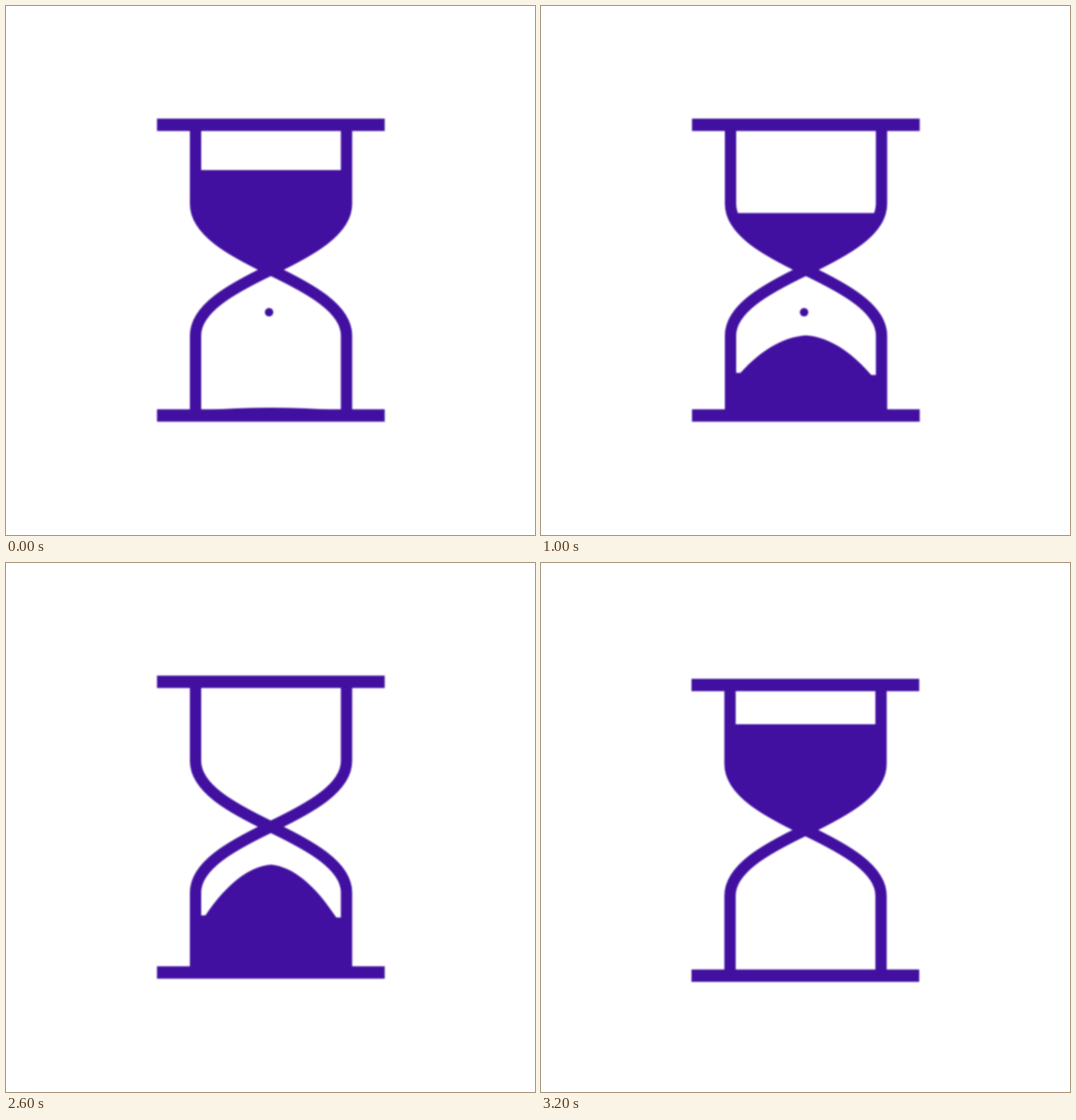
Write an HTML page that moves like this. It is 748 px wide and 748 px high and loops after 3.8 s.

```html
<!DOCTYPE html>
<html lang="en">
<head>
<meta charset="utf-8">
<title>Hourglass</title>
<style>
  html, body { margin: 0; width: 100%; height: 100%; overflow: hidden; background: #fff; }
  svg { display: block; width: 100%; height: 100%; filter: blur(.8px); }
  path, rect, circle { fill: #4210a0; }
  .line { fill: none; stroke: #4210a0; stroke-width: 16; }
  .bar { stroke-width: 17.5; }
  .turning .line { stroke-width: 14.5; }
  .turning .bar { stroke-width: 15.5; }
</style>
</head>
<body>
<svg viewBox="0 0 748 748">
  <defs>
    <clipPath id="inside">
      <path d="M268 168V280C268 318 318 346 374.5 373C431 346 481.5 318 481.5 280V168Z
               M268 579V466C268 428 318 400 374.5 373C431 400 481.5 428 481.5 466V579Z"/>
    </clipPath>
  </defs>
  <g id="glass">
    <g clip-path="url(#inside)">
      <rect id="upper" x="260" width="230"/>
      <path id="mound"/>
    </g>
    <circle id="grain" cx="372" cy="433" r="6"/>
    <path class="line" d="M268 168V280C268 318 318 346 374.5 373C431 400 481.5 428 481.5 466V579
                          M481.5 168V280C481.5 318 431 346 374.5 373C318 400 268 428 268 466V579"/>
    <path class="line bar" d="M213.5 168H535.5M213.5 579H535.5"/>
  </g>
</svg>
<script>
const STEP = 200, LOOP = 3800;
const TURN = 14, REFILL = 16;   // steps where the flip starts and ends
const NECK = 373, MID = 374.5, FLOOR = 579;
const $ = id => document.getElementById(id);

function moundPath(peak, edge) {
  const inset = edge < 530 ? 6 : 0;
  const left = 276 + inset, right = 473 - inset;
  const end = edge + inset / 2;
  const lw = (MID - left) / 3, rw = (right - MID) / 3;
  const low = y => y - 0.63 * (y - peak);
  const high = peak + 0.04 * (edge - peak);
  return `M260 ${FLOOR}V${edge}H${left}` +
    `C${left + lw} ${low(edge)} ${MID - lw} ${high} ${MID} ${peak}` +
    `C${MID + rw} ${high} ${right - rw} ${low(end)} ${right} ${end}H490V${FLOOR}Z`;
}

function pose(i) {
  if (i < TURN) return "";
  if (i < REFILL) return `rotate(${60 * (i - TURN + 1)} 374.5 373.7)`;
  return "translate(-.7 4.5)";
}

function draw(i) {
  const full = i === REFILL;
  const level = full ? 223.5 : Math.min(NECK, 232 + 12 * i + 0.006 * i ** 3);
  const left = Math.exp(-0.105 * i ** 1.55);   // share of the mound still to rise
  $("upper").setAttribute("y", level);
  $("upper").setAttribute("height", NECK - level);
  $("mound").setAttribute("d", full ? "" : moundPath(426 + 142 * left, 498 + 74 * left));
  $("grain").style.display = i < 9 ? "" : "none";
  $("glass").setAttribute("transform", pose(i));
  $("glass").classList.toggle("turning", i >= TURN && !full);
}

let shown = -1;
function tick() {
  const i = Math.min(Math.floor(performance.now() % LOOP / STEP), REFILL);
  if (i !== shown) draw(shown = i);
  requestAnimationFrame(tick);
}
tick();
</script>
</body>
</html>
```
